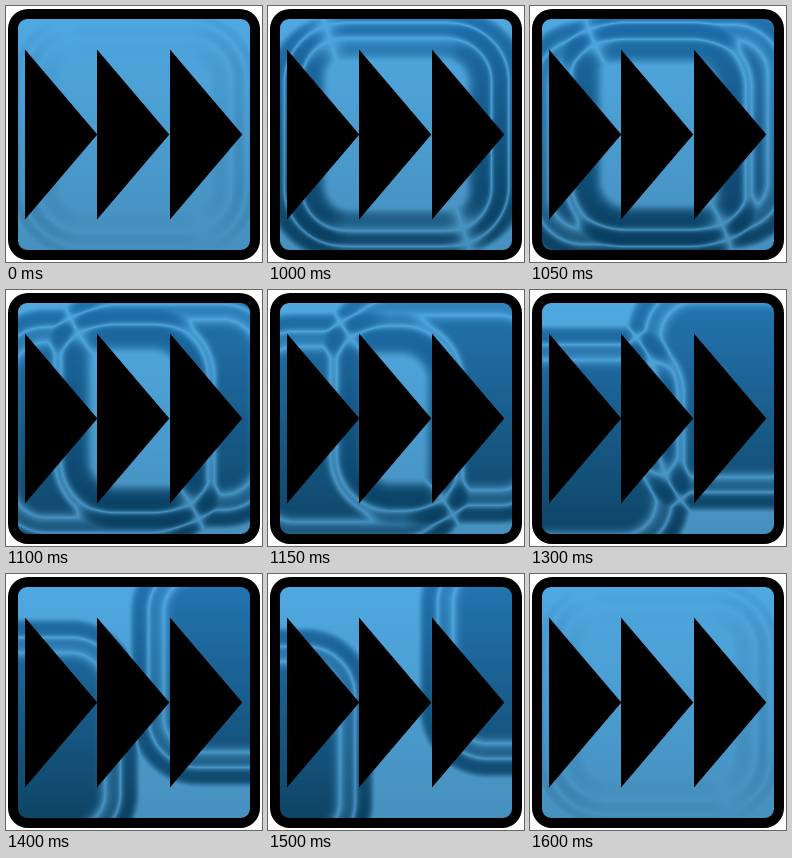
Recreate the animation shown at these times as an HTML page with a canvas. Size 256 px wide and 256 px high, loop 1.65 s.

```html
<!DOCTYPE html>
<html>
<head>
<meta charset="utf-8">
<style>
  html, body { margin: 0; width: 100%; height: 100%; overflow: hidden; background: #fff; }
  canvas { display: block; width: 256px; height: 256px; }
</style>
</head>
<body>
<canvas id="stage" width="256" height="256"></canvas>
<script>
const ctx = document.getElementById('stage').getContext('2d');
const LOOP = 1650, HOLD = 1000, STEP = 50, LAST = 13;
const X = 12, Y = 13, W = 232, H = 231;
const LIGHT = [[79, 168, 224], [70, 144, 190]];
const DARK = [[29, 108, 168], [6, 58, 90]];
// Rim profile as [depth, height]: a ridge, a groove, then a plateau
const RIM = [[4, 0], [16, 1.05], [31, -0.5], [54, 0.9]];
const pixels = ctx.createImageData(W, H);
const mix = (a, b, t) => a + (b - a) * t;

// Depth inside a rounded square centred on the origin
function depth(x, y) {
  const r = 75, qx = Math.abs(x) - 128 + r, qy = Math.abs(y) - 128 + r;
  return r - Math.hypot(Math.max(qx, 0), Math.max(qy, 0)) - Math.min(Math.max(qx, qy), 0);
}

function relief(d) {
  if (d <= RIM[0][0]) return 0;
  const n = RIM.findIndex(p => d < p[0]);
  if (n < 0) return RIM[RIM.length - 1][1];
  const [d0, h0] = RIM[n - 1], [d1, h1] = RIM[n];
  return mix(h0, h1, (1 - Math.cos(Math.PI * (d - d0) / (d1 - d0))) / 2);
}

// Two reliefs slide apart; the water darkens where they differ
function paintWater(travel) {
  const dx = 13.6 * travel, dy = 4.4 * travel;
  for (let y = 0, i = 0; y < H; y++) {
    const v = y / (H - 1), py = y + Y - 128;
    const light = LIGHT[0].map((c, n) => mix(c, LIGHT[1][n], v));
    const dark = DARK[0].map((c, n) => mix(c, DARK[1][n], v));
    for (let x = 0; x < W; x++) {
      const px = x + X - 128;
      const gap = relief(depth(px - dx, py + dy)) - relief(depth(px + dx, py - dy));
      const shade = Math.tanh(1.5 * Math.abs(gap));
      for (let n = 0; n < 3; n++) pixels.data[i++] = mix(light[n], dark[n], shade);
      pixels.data[i++] = 255;
    }
  }
  ctx.putImageData(pixels, X, Y);
}

function paint(step) {
  ctx.clearRect(0, 0, 256, 256);
  paintWater(step ? step - 0.4 : 0.03);
  ctx.fillStyle = '#000';
  ctx.beginPath();
  ctx.roundRect(2, 3, 252, 251, 20);
  ctx.roundRect(X, Y, W, H, 9);
  ctx.fill('evenodd');
  ctx.beginPath();
  for (const x of [19, 91, 164]) {
    ctx.moveTo(x, 43.5);
    ctx.lineTo(x + 72.3, 128.5);
    ctx.lineTo(x, 213.5);
    ctx.closePath();
  }
  ctx.fill();
}

const start = performance.now();
let shown = -1;
function tick() {
  const t = (performance.now() - start) % LOOP;
  const step = t < HOLD ? 0 : (Math.floor((t - HOLD) / STEP) + 1) % LAST;
  if (step !== shown) paint(shown = step);
  requestAnimationFrame(tick);
}
tick();
</script>
</body>
</html>
```
